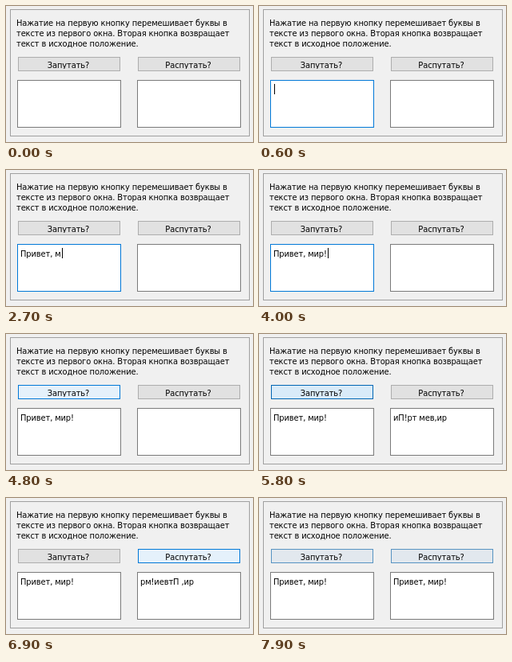
Write an HTML page that moves like this. It is 309 by 171 pixels and loops after 8000 ms.

```html
<!DOCTYPE html>
<html lang="ru">
<head>
<meta charset="utf-8">
<style>
  html, body { margin: 0; width: 100%; height: 100%; overflow: hidden; background: #f0f0f0; }
  body {
    position: relative; color: #000; white-space: pre;
    font: 11px/13px "DejaVu Sans Condensed", "DejaVu Sans", sans-serif;
    letter-spacing: calc(6.18px - 1ch);
  }
  div { position: absolute; box-sizing: border-box; }
  .groove { left: 5px; top: 4px; width: 300px; height: 160px; border: 1px solid #a0a0a0; }
  .groove.light { left: 6px; top: 5px; border-color: #fff; }
  .groove.light { width: 300px; height: 160px; z-index: -1; }
  .intro { left: 13px; top: 15px; }
  .button { top: 64px; width: 128px; height: 18px; border: 1px solid; }
  .button div { top: 3px; left: -1px; width: 126px; height: 11px; overflow: hidden; text-align: center; }
  .box { top: 93px; width: 130px; height: 60px; border: 1px solid #7a7a7a; background: #fff; }
  .box div { left: 3px; top: 5px; }
  #caret { position: absolute; top: -1px; width: 1px; height: 13px; margin-left: 1px; background: #000; }
</style>
</head>
<body><div class="groove light"></div><div class="groove"></div><div class="intro">Нажатие на первую кнопку перемешивает буквы в
тексте из первого окна. Вторая кнопка возвращает
текст в исходное положение.</div><div class="button" id="mix" style="left:15px"><div>Запутать?</div></div><div class="button" id="restore" style="left:165px"><div>Распутать?</div></div><div class="box" id="input" style="left:14px"><div><span id="typed"></span><span id="caret"></span></div></div><div class="box" style="left:164px"><div id="output"></div></div>
<script>
const LOOP = 8000;
const PHRASE = "Привет, мир!";
const $ = id => document.getElementById(id);

// Button looks: [fill, border]
const LOOKS = {
  normal: ["#e1e1e1", "#adadad"],
  fading: ["#e2e8ee", "#5793c2"],
  hover: ["#e5f1fb", "#0078d7"],
  pressed: ["#cce4f7", "#005499"],
  releasing: ["#d9ebf9", "#0066b4"]
};

// Each track lists [start time, value]; a value holds until the next one.
const KEY_TIMES = [1300, 1400, 1500, 1600, 1700, 1800, 2400, 2500, 2700, 2800, 2900, 3100];
const TRACKS = {
  typed: [[0, 0], ...KEY_TIMES.map((time, i) => [time, i + 1])],
  focus: [[0, false], [600, true], [4800, false]],
  caret: [[0, false], [600, true], [1100, false], [1300, true], [2100, false],
          [2400, true], [3500, false], [4000, true], [4500, false]],
  mix: [[0, "normal"], [4500, "fading"], [4600, "hover"], [4900, "pressed"], [5000, "releasing"],
        [6000, "hover"], [6200, "pressed"], [6300, "releasing"], [6700, "hover"],
        [6800, "fading"], [6900, "normal"], [7900, "fading"]],
  restore: [[0, "normal"], [6800, "fading"], [6900, "hover"], [7500, "releasing"],
            [7700, "hover"], [7900, "fading"]],
  output: [[0, ""], [5000, "мтиП,ре!рви "], [5800, "иП!рт мев,ир"], [6300, ",ивер! иПмрт"],
           [6600, "рм!иевтП ,ир"], [7500, PHRASE]]
};

const valueAt = (track, time) => track.findLast(([start]) => start <= time)[1];

function paintButton(id, time) {
  const [fill, border] = LOOKS[valueAt(TRACKS[id], time)];
  $(id).style.background = fill;
  $(id).style.borderColor = border;
}

function draw(now) {
  const time = now % LOOP;
  paintButton("mix", time);
  paintButton("restore", time);
  $("typed").textContent = PHRASE.slice(0, valueAt(TRACKS.typed, time));
  $("output").textContent = valueAt(TRACKS.output, time);
  $("caret").style.visibility = valueAt(TRACKS.caret, time) ? "visible" : "hidden";
  $("input").style.borderColor = valueAt(TRACKS.focus, time) ? "#0078d7" : "#7a7a7a";
  requestAnimationFrame(draw);
}
draw(0);
</script>
</body>
</html>
```
